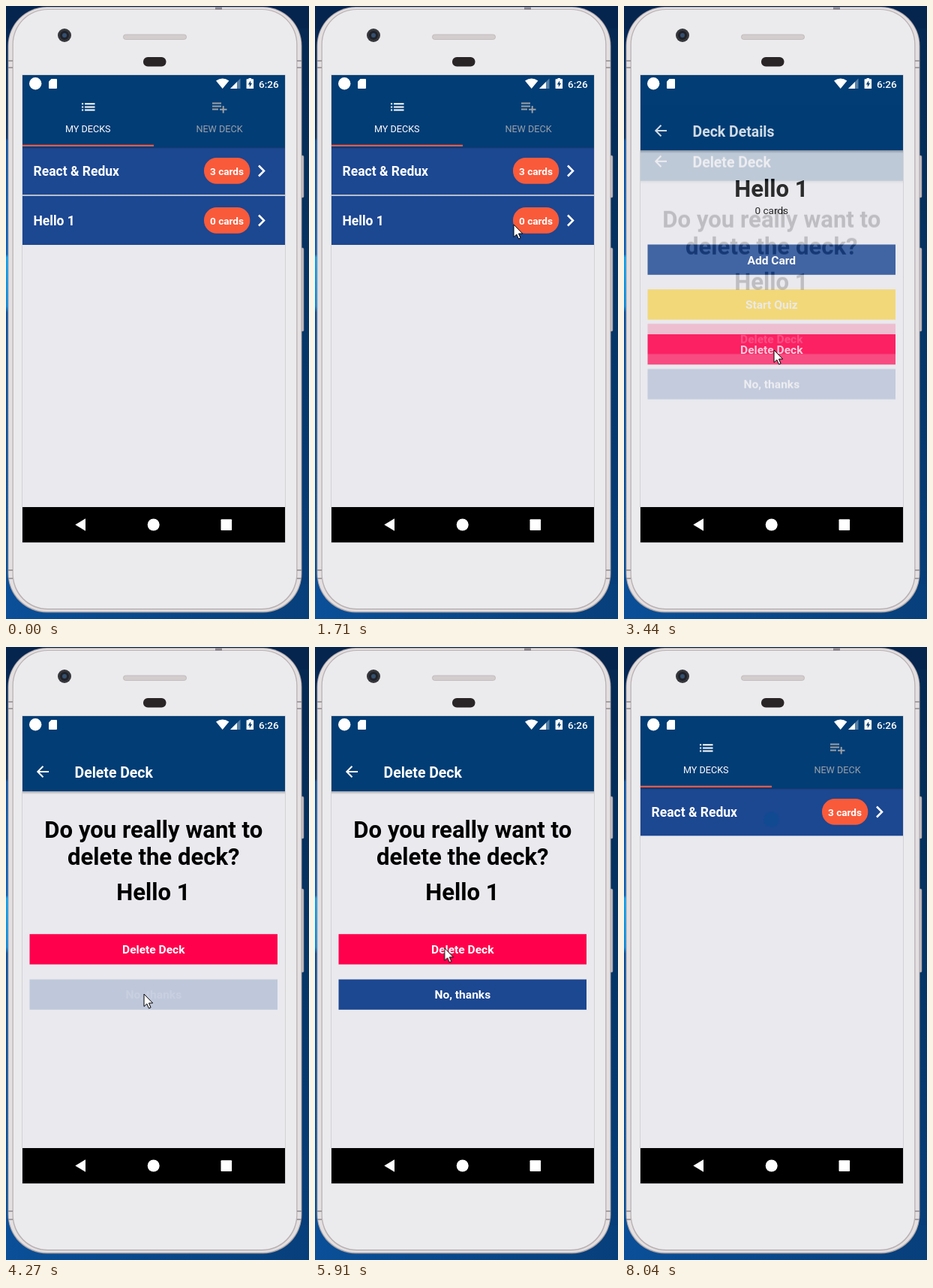
Animation, 404 px wide and 816 px high, one loop 8100 ms. Source, as an HTML page:

```html
<!DOCTYPE html>
<html lang="en">
<head>
<meta charset="utf-8">
<title>Flashcards demo</title>
<style>
html, body { margin: 0; width: 100%; height: 100%; overflow: hidden; background: #06264f; }
svg { display: block; width: 404px; height: 816px; }
text { font-family: Roboto, "Noto Sans", sans-serif; fill: #fff; }
.mid { text-anchor: middle; }
.tab { font-size: 12.64px; }
.title { font-size: 19.44px; font-weight: 700; }
.name { font-size: 17.5px; font-weight: 700; }
.pill { font-size: 13.6px; font-weight: 700; }
.btn { font-size: 15.55px; font-weight: 700; }
.head { font-size: 31.1px; font-weight: 700; fill: #000; }
.count { font-size: 13.6px; fill: #000; }
.line { fill: none; stroke: #fff; stroke-width: 2; }

.anim, #cancel text { animation: 8100ms linear infinite; }
#row2 { animation-name: row2; }
#spot { animation-name: spot; }
#details { animation-name: details; }
#confirm { animation-name: confirm; }
#open-delete { animation-name: open-delete; }
#do-delete { animation-name: do-delete; }
#cancel, #cancel text { animation-name: cancel; }
#cursor { animation-name: cursor; animation-timing-function: ease-in-out; }

@keyframes row2 {
  0%, 77.77% { opacity: 1; }
  77.78%, 100% { opacity: 0; }
}
@keyframes spot {
  0%, 77.77% { opacity: 0; }
  77.78%, 100% { opacity: 1; }
}
@keyframes details {
  0% { opacity: 0; transform: translateY(50px); }
  24.44% { opacity: 0; transform: translateY(50px); animation-timing-function: ease-out; }
  28.77%, 77.77% { opacity: 1; transform: none; }
  77.78%, 100% { opacity: 0; transform: translateY(50px); }
}
@keyframes confirm {
  0% { opacity: 0; transform: translateY(50px); }
  41.98%, 66.91% { opacity: 0; transform: translateY(50px); animation-timing-function: ease-out; }
  46.3%, 71.23% { opacity: 1; transform: none; }
  54.32%, 77.78% { opacity: 1; transform: none; animation-timing-function: ease-in; }
  58.64%, 82.1%, 100% { opacity: 0; transform: translateY(50px); }
}
@keyframes open-delete {
  0%, 39.5%, 43%, 64.4%, 68%, 100% { opacity: 1; }
  40.1%, 40.7%, 65%, 65.6% { opacity: .2; }
}
@keyframes do-delete {
  0%, 75.3%, 78.5%, 100% { opacity: 1; }
  75.9%, 77% { opacity: .2; }
}
@keyframes cancel {
  0%, 50.6%, 55.5%, 100% { opacity: 1; }
  51.9%, 53.1% { opacity: .2; }
}
@keyframes cursor {
  0%, 9.88% { transform: translate(330px, 820px); }
  18.5%, 23.5% { transform: translate(265px, 291px); }
  32.1%, 33.95% { transform: translate(110px, 494px); }
  38.3%, 43.2% { transform: translate(200px, 458px); }
  49.4%, 54.3% { transform: translate(184px, 462px); }
  60.5%, 67.3% { transform: translate(223px, 457px); }
  73.5%, 83.33% { transform: translate(172px, 400px); }
  92.6%, 100% { transform: translate(90px, 820px); }
}
</style>
</head>
<body>
<svg viewBox="0 0 404 816">
  <defs>
    <linearGradient id="wall-left" x2="0" y2="1">
      <stop offset="0" stop-color="#05254f"/>
      <stop offset=".215" stop-color="#083469"/>
      <stop offset=".22" stop-color="#0a52a4"/>
      <stop offset=".405" stop-color="#0a62bb"/>
      <stop offset=".41" stop-color="#0aa2f2"/>
      <stop offset=".49" stop-color="#0a8ade"/>
      <stop offset=".5" stop-color="#0a509c"/>
      <stop offset="1" stop-color="#0a4f98"/>
    </linearGradient>
    <linearGradient id="wall-right" x2="0" y2="1">
      <stop offset="0" stop-color="#052850"/>
      <stop offset=".5" stop-color="#053566"/>
      <stop offset="1" stop-color="#073f7b"/>
    </linearGradient>
    <linearGradient id="wall-foot">
      <stop offset="0" stop-color="#0a4f98"/>
      <stop offset="1" stop-color="#073f7b"/>
    </linearGradient>
    <linearGradient id="shade" x2="0" y2="1">
      <stop offset="0" stop-color="#000" stop-opacity=".3"/>
      <stop offset="1" stop-color="#000" stop-opacity="0"/>
    </linearGradient>
    <clipPath id="view"><rect x="22" y="115" width="350" height="552"/></clipPath>
    <path id="chevron" class="line" style="stroke-width:2.6" d="M337 212.5l7 7-7 7"/>
    <g id="bar">
      <rect x="22" y="115" width="350" height="552" fill="#e9e9ee"/>
      <rect x="22" y="192" width="350" height="4" fill="url(#shade)"/>
      <rect x="22" y="92" width="350" height="100" fill="#023d75"/>
      <path class="line" d="M57 166H42.5M49.5 158.8L42.3 166l7.2 7.2"/>
    </g>
  </defs>

  <!-- wallpaper -->
  <rect width="404" height="816" fill="url(#wall-right)"/>
  <rect width="30" height="816" fill="url(#wall-left)"/>
  <rect y="770" width="404" height="46" fill="url(#wall-foot)"/>
  <rect width="404" height="30" fill="#05254f"/>

  <!-- phone -->
  <g fill="#c5bfc2" stroke="#85828a" stroke-width=".6">
    <rect x="391" y="199" width="6" height="56" rx="1.5"/>
    <rect x="391" y="322" width="6" height="111" rx="1.5"/>
  </g>
  <rect x="2.5" y="1" width="392" height="806.5" rx="52" fill="#aaa3a6"/>
  <rect x="3.5" y="2" width="390" height="804" rx="51" fill="#e4dfe0"/>
  <rect x="8.5" y="4" width="380" height="799.5" rx="47" fill="#b9b1b4"/>
  <rect x="9.8" y="5" width="377.4" height="797" rx="46" fill="#ebebed"/>
  <path d="M3 73h6M3 82h6M388 73h6M388 82h6M3 751h6M3 762h6M388 751h6M388 762h6" stroke="#918b90" stroke-width="1.4"/>
  <rect x="279" y="1" width="9" height="4" fill="#8e898f"/>
  <circle cx="78" cy="39" r="9" fill="#36373c"/>
  <circle cx="78" cy="39" r="6" fill="#202229"/>
  <circle cx="78" cy="39" r="3" fill="#35506f"/>
  <rect x="156.500" y="38" width="84" height="6.500" rx="3" fill="#d3cdcd" stroke="#b8b1b2" stroke-width=".7"/>
  <rect x="183" y="68" width="30.5" height="12.5" rx="6" fill="#292426"/>
  <rect x="21.5" y="91.5" width="351" height="623" fill="#b9b9be"/>

  <!-- deck list -->
  <rect x="22" y="92" width="350" height="622" fill="#e9e9ee"/>
  <rect x="22" y="92" width="350" height="96" fill="#023d75"/>
  <rect x="22" y="184.7" width="175" height="2.2" fill="#ee5a49"/>
  <path class="line" d="M101 130.2h2.2M105 130.2h13.5M101 134.4h2.2M105 134.4h13.5M101 138.6h2.2M105 138.6h13.5"/>
  <path class="line" style="stroke:#9b9fa6" d="M275 129.5h12M275 133.5h12M275 137.5h8M285 137.8h9.5M289.7 133v9.5"/>
  <text class="tab mid" x="109.3" y="167.5">MY DECKS</text>
  <text class="tab mid" x="284.5" y="167.5" style="fill:#98a0a9">NEW DECK</text>
  <rect x="22" y="188" width="350" height="63.3" fill="#1c4791"/>
  <rect x="22" y="188" width="350" height="2" fill="url(#shade)"/>
  <circle id="spot" class="anim" cx="196.5" cy="229.500" r="10.500" fill="#124a92"/>
  <text class="name" x="36.5" y="226.3">React &amp; Redux</text>
  <rect x="264" y="202" width="61.3" height="34.7" rx="17" fill="#f95a3a"/>
  <text class="pill mid" x="294.5" y="224.8">3 cards</text>
  <use href="#chevron"/>
  <g id="row2" class="anim">
    <rect x="22" y="251.3" width="350" height="1.7" fill="#b9bfcb"/>
    <rect x="22" y="253" width="350" height="65" fill="#1c4791"/>
    <text class="name" x="36.5" y="292.3">Hello 1</text>
    <rect x="264" y="268" width="61.3" height="34.7" rx="17" fill="#f95a3a"/>
    <text class="pill mid" x="294.5" y="290.8">0 cards</text>
    <use href="#chevron" y="66"/>
  </g>

  <g clip-path="url(#view)">
    <g id="details" class="anim">
      <use href="#bar"/>
      <text class="title" x="91.5" y="174">Deck Details</text>
      <text class="head mid" x="196.5" y="253.5">Hello 1</text>
      <text class="count mid" x="196.8" y="276.5">0 cards</text>
      <rect x="31.5" y="317.5" width="330.5" height="40.3" fill="#1c4791"/>
      <text class="btn mid" x="196.8" y="343.5">Add Card</text>
      <rect x="31.5" y="377.2" width="330.5" height="40.3" fill="#f4d45f"/>
      <text class="btn mid" x="196.8" y="403.4" style="fill:#ebe9e4">Start Quiz</text>
      <g id="open-delete" class="anim">
        <rect x="31.5" y="437" width="330.5" height="40.3" fill="#ff004c"/>
        <text class="btn mid" x="196.8" y="463.2">Delete Deck</text>
      </g>
    </g>
    <g id="confirm" class="anim">
      <use href="#bar"/>
      <text class="title" x="91.5" y="174">Delete Deck</text>
      <text class="head mid" x="196.8" y="253.5">Do you really want to</text>
      <text class="head mid" x="196.8" y="289.5">delete the deck?</text>
      <text class="head mid" x="196.5" y="337">Hello 1</text>
      <g id="do-delete" class="anim">
        <rect x="31.5" y="382.2" width="330.5" height="40.3" fill="#ff004c"/>
        <text class="btn mid" x="196.8" y="408.4">Delete Deck</text>
      </g>
      <g id="cancel" class="anim">
        <rect x="31.5" y="442.5" width="330.5" height="40.3" fill="#1c4791"/>
        <text class="btn mid" x="196.8" y="468.4">No, thanks</text>
      </g>
    </g>
  </g>

  <!-- status bar -->
  <g fill="#fff">
    <circle cx="39.2" cy="103.3" r="8.2"/>
    <path d="M60.5 97H67q1 0 1 1v11q0 1-1 1h-9q-1 0-1-1v-8.5z"/>
    <path d="M280 99.5q8.7-6 17.4 0L288.7 110z"/>
    <path d="M312.5 96.5V110H299z" opacity=".35"/>
    <path d="M308 101V110h-9z"/>
    <path d="M323.5 97.3V96h3.6v1.3h2.4q.6 0 .6.6V109.4q0 .6-.6.6h-8.3q-.6 0-.6-.6V97.9q0-.6.6-.6z"/>
    <path d="M326.2 99.2l-3.4 5.2h2v3.6l3.300-5.200h-1.900z" fill="#023d75"/>
  </g>
  <text x="337" y="108.5" font-size="13.6" font-weight="500">6:26</text>

  <!-- navigation bar -->
  <rect x="22" y="667" width="350" height="47"/>
  <g fill="#fff">
    <path d="M106 682.3v16.4L92.3 690.5z"/>
    <circle cx="196.7" cy="690.5" r="8"/>
    <rect x="286.5" y="683.3" width="14.6" height="14.6" rx="1"/>
  </g>

  <path id="cursor" class="anim" d="M0 0V16.5L3.8 13l2.700 6 2.600-1.100L6.500 12H11.700Z" fill="#fff" stroke="#000"/>
</svg>
</body>
</html>
```
